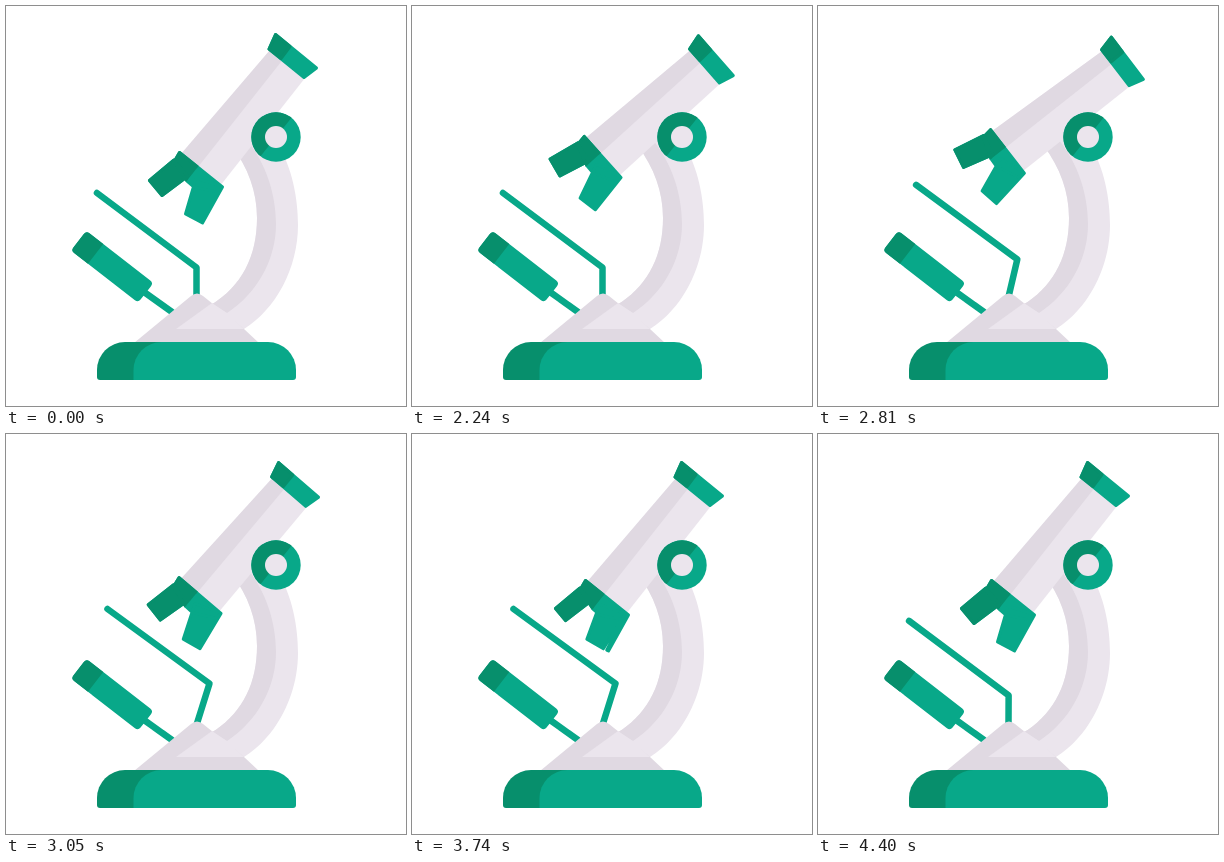
An HTML page that plays this animation: 400 px wide and 400 px high, repeating every 4430 ms.

```html
<!DOCTYPE html>
<html lang="en">
<head>
<meta charset="utf-8">
<title>Microscope</title>
<style>
  html, body { margin: 0; width: 100%; height: 100%; overflow: hidden; background: #fff; }
  svg { display: block; width: 100%; height: 100%; }
  .light { color: #ebe5ed; }
  .shade { color: #e0d9e2; }
  .green { color: #08a889; }
  .dark { color: #078f6c; }
  path, rect, circle { fill: currentColor; }
  .round { stroke: currentColor; stroke-width: 3; stroke-linejoin: round; }
  .line { fill: none; stroke: currentColor; stroke-width: 6.5; stroke-linecap: round; stroke-linejoin: round; }
</style>
</head>
<body>
<svg viewBox="0 0 400 400">
  <defs>
    <clipPath id="left"><path d="M276 54L150 214L100 214L100 54Z"/></clipPath>
    <clipPath id="knobLeft"><path d="M295 100L245 162L230 162L230 90Z"/></clipPath>
    <path id="turret" class="round"/>
  </defs>

  <!-- arm -->
  <path class="light" d="M240 133L270 135C287 162 292 194 292 219C292 262 270 303 238 323L205 323V299C236 280 251 250 251 212C251 185 242 162 226 140Z"/>
  <path class="shade" d="M226 140L240 133C261 158 270 190 270 218C270 255 250 288 221 307L205 299C236 280 251 250 251 212C251 185 242 162 226 140Z"/>

  <!-- tube -->
  <g id="tube">
    <path class="light" d="M264.500 43.500L299 72L214 180L175.500 147.500Z"/>
    <path class="shade" d="M264.500 43.500L276.500 54L192 161L175.500 147.500Z"/>
    <path class="green round" d="M269.500 28.500L310.500 62L298 71.500L263 43Z"/>
    <path class="dark round" d="M269.500 28.500L284 40.500L275 52.500L263 43Z"/>
    <use href="#turret" class="green"/>
    <use href="#turret" class="dark" clip-path="url(#left)"/>
  </g>

  <!-- knob -->
  <circle class="green" cx="270" cy="131" r="24.700"/>
  <circle class="dark" cx="270" cy="131" r="24.700" clip-path="url(#knobLeft)"/>
  <circle class="light" cx="270" cy="131" r="11"/>

  <!-- stage and mirror -->
  <path id="stage" class="green line"/>
  <path class="green line" d="M138 286L166 306"/>
  <g transform="translate(106.200 260.800) rotate(37.800)">
    <rect class="green" x="-42.500" y="-12.500" width="85" height="25" rx="4"/>
    <path class="dark" d="M-21 -12.500H-38.500Q-42.500 -12.500 -42.500 -8.500V8.500Q-42.500 12.500 -38.500 12.500H-21Z"/>
  </g>

  <!-- base -->
  <path class="shade" d="M128 337L185 290Q191 285 197 290L207 298L238 323L253 337Z"/>
  <path class="light" d="M206 297L170 323H238L221 307Z"/>
  <path class="dark" d="M91 371V364A28 28 0 0 1 119 336H160V374H94Q91 374 91 371Z"/>
  <path class="green" d="M127.500 374V364A28 28 0 0 1 155.500 336H262A28 28 0 0 1 290 364V371Q290 374 287 374Z"/>
</svg>
<script>
const LOOP = 4430;
const tube = document.getElementById('tube');
const turret = document.getElementById('turret');
const stage = document.getElementById('stage');

// Objective outlines around the turret: left edge, left, right, right edge
const POSES = [
  [[168, 154], [143.5, 174.5], [143.5, 174.5], [168, 154]],
  [[168, 154], [143.5, 174.5], [156, 189.5], [182, 170]],
  [[190, 172], [179.5, 208], [196.5, 217], [216.5, 181]],
  [[216.5, 181], [196.5, 217], [196.5, 217], [216.5, 181]]
];
const COLLAR = 'M173.5 146.5L168 156L181 175L188 181L211 186L216.5 181Z';

const mix = (a, b, k) => a + (b - a) * k;

function ease(t, from, to) {
  const k = Math.min(1, Math.max(0, (t - from) / (to - from)));
  return k * k * (3 - 2 * k);
}

function objective(i, turn) {
  const k = i === 0 ? turn * turn : turn; // the incoming one is foreshortened
  const bulge = i === 1 ? Math.sin(Math.PI * k) : 0;
  const points = POSES[i].map(([x, y], j) => {
    const [x2, y2] = POSES[i + 1][j];
    const out = j === 1 || j === 2 ? bulge : 0;
    return [mix(x, x2, k) - 3 * out, mix(y, y2, k) + 2 * out];
  });
  return 'M' + points.join('L') + 'Z';
}

function draw(t) {
  const tilt = 20 * (ease(t, 2000, 2500) - ease(t, 2600, 3150));
  tube.setAttribute('transform', `rotate(${tilt} 270 131)`);

  const turn = ease(t, 3100, 3900) % 1;
  const shown = turn > 0 ? [0, 1, 2] : [1, 2];
  turret.setAttribute('d', COLLAR + shown.map(i => objective(i, turn)).join(''));

  const lift = ease(t, 2500, 3000) - ease(t, 3930, 4430);
  const tip = [91 + 10.5 * lift, 187 - 12 * lift];
  const elbow = [190.5 + 13 * lift, 261.5 - 12 * lift];
  stage.setAttribute('d', `M${tip}L${elbow}L190.5 291`);
}

const start = performance.now();
function tick() {
  draw((performance.now() - start) % LOOP);
  requestAnimationFrame(tick);
}
tick();
</script>
</body>
</html>
```
